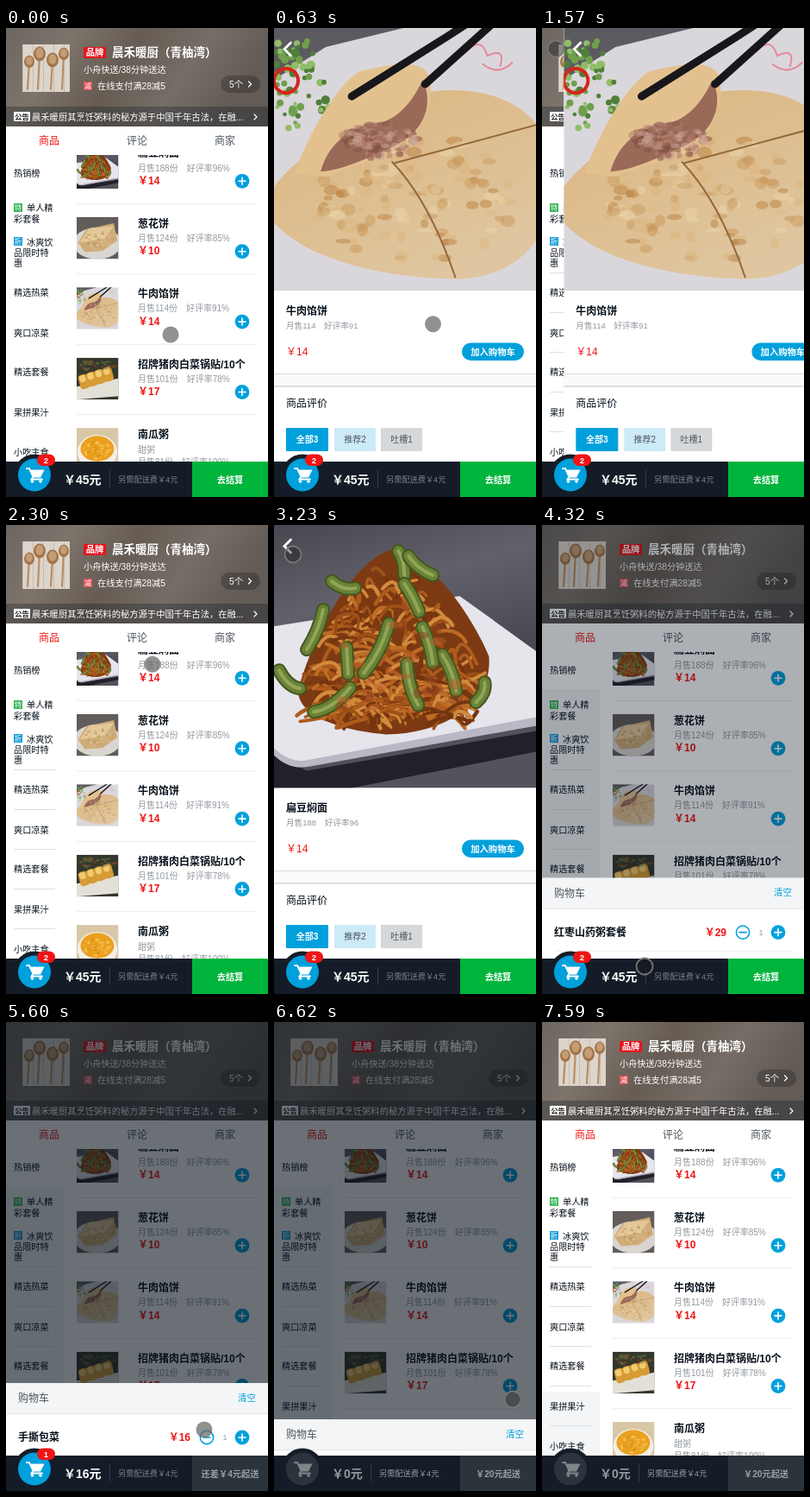
An HTML page for the animation above (7.71 s loop, 304x543 px).

```html
<!DOCTYPE html>
<html lang="zh-CN">
<head>
<meta charset="utf-8">
<style>
html,body{margin:0;width:100%;height:100%;overflow:hidden;background:#fff}
svg{display:block}
#stage{width:100vw;height:100vh}
text{font-family:"Liberation Sans","Noto Sans CJK SC","Noto Sans CJK",sans-serif;white-space:pre}
</style>
</head>
<body>
<svg id="stage" viewBox="0 0 304 543"></svg>
<script>
const LOOP = 7710;
const BLUE = '#00a0dc', RED = '#f01414', INK = '#07111b', GRAY = '#93999f';
const stage = document.getElementById('stage');

let seed = 7;
const rnd = () => (seed = seed * 16807 % 2147483647) / 2147483647;
const between = (a, b) => a + (b - a) * rnd();
const pick = list => list[Math.floor(rnd() * list.length)];
const times = (n, draw) => Array.from({length: n}, (_, i) => draw(i)).join('');

// Shape helpers; text is placed by its vertical centre.
const text = (x, y, size, str, fill = INK, extra = '') =>
  `<text x="${x}" y="${y + size * .36}" font-size="${size}" fill="${fill}" ${extra}>${str}</text>`;
const bold = 'font-weight="700"', mid = 'text-anchor="middle"';
const rect = (x, y, w, h, fill, extra = '') =>
  `<rect x="${x}" y="${y}" width="${w}" height="${h}" fill="${fill}" ${extra}/>`;
const circle = (x, y, r, fill, extra = '') =>
  `<circle cx="${x}" cy="${y}" r="${r}" fill="${fill}" ${extra}/>`;
const oval = (x, y, rx, ry, fill, extra = '') =>
  `<ellipse cx="${x}" cy="${y}" rx="${rx}" ry="${ry}" fill="${fill}" ${extra}/>`;
const path = (d, fill, extra = '') => `<path d="${d}" fill="${fill}" ${extra}/>`;
const line = (d, color, width = 1, extra = '') =>
  path(d, 'none', `stroke="${color}" stroke-width="${width}" stroke-linecap="round" ${extra}`);
const rule = (x, y, w, color = '#e4e6e8') => rect(x, y, w, 1, color);
const plus = (x, y) => circle(x, y, 8.4, BLUE) + line(`M${x - 4} ${y}h8M${x} ${y - 4}v8`, '#fff', 1.6);
const minus = (x, y) => circle(x, y, 7.6, '#fff', `stroke="${BLUE}" stroke-width="1.6"`) +
  line(`M${x - 4} ${y}h8`, BLUE, 1.6);
const tag = (x, y, str, fill) => rect(x, y - 5, 10, 10, fill) + text(x + 5, y, 8, str, '#fff', mid);

// Dishes, each on a 304 x 304 square.
const grains = (n, cx, cy, rx, ry, size, colors) => times(n, () => {
  const a = between(0, 6.283), r = Math.sqrt(rnd());
  return oval(cx + Math.cos(a) * r * rx, cy + Math.sin(a) * r * ry,
    between(.4, 1) * size, between(.25, .7) * size, pick(colors), 'opacity=".5"');
});

function noodles() {
  const strands = times(300, () => {
    const y = 40 + 190 * Math.sqrt(rnd()), half = Math.min(14 + (y - 30) * .72, 106);
    const x = 139 + between(-half, half) * .86, dx = between(-52, 52) * half / 106, dy = between(-16, 16);
    return line(`M${x - dx / 2} ${y - dy / 2}q${dx / 2 + between(-9, 9)} ${-between(2, 24)} ${dx} ${dy}`,
      pick(['#74350f', '#9c4f17', '#bd6c26', '#d28a3c', '#ae5b1d']), between(3, 4.5));
  });
  const beans = ['M57 98Q52 122 38 144', 'M133 114Q125 145 104 171', 'M84 142L86 172', 'M154 160Q156 190 167 208',
    'M46 216Q68 213 88 188', 'M6 168Q16 187 30 189', 'M195 150Q208 170 211 192', 'M144 30Q151 40 151 58',
    'M156 36Q165 50 184 58', 'M151 68Q162 84 168 100', 'M172 118Q182 140 184 160', 'M67 65Q80 76 94 73', 'M234 205Q246 194 244 182'];
  return rect(0, 0, 304, 304, 'url(#slate)') +
    path('M0 264L38 284 304 238V262L90 304H0Z', '#222028') +
    path('M0 117L70 106 215 82 304 146V229L42 278Q18 283 0 262Z', '#e6e5ec') +
    path('M0 258Q20 277 42 271L304 222V232L42 279Q18 284 0 266Z', '#b9b8c4') +
    path('M28 190C45 130 90 40 138 28 182 34 232 110 249 152 254 210 190 242 130 242 80 238 26 222 28 190Z', '#7d3a12') +
    strands + beans.map(d => line(d, '#43571f', 16) + line(d, '#6a8236', 12) + line(d, '#92a557', 4)).join('') +
    grains(30, 140, 165, 85, 65, 10, ['#8e3f1b', '#b95b2a']);
}

function beefPie() {
  const leaves = times(60, () => {
    const y = between(15, 118);
    return circle(between(2, y < 60 ? 45 : 66), y, between(2, 5.5), pick(['#6f9f4c', '#90bd68', '#4f7f38']));
  });
  return rect(0, 0, 304, 304, '#dad7dc') + path('M0 0H150L60 22 0 60Z', '#5b5a60') +
    line('M222 28q18-20 25 4q22-10 15 12M242 42q18 14 34-2', '#e58a98', 2) + leaves +
    circle(14, 61, 14, 'none', 'stroke="#d4261c" stroke-width="4"') +
    path('M0 184C15 160 90 100 150 80 230 58 285 84 304 112V245C285 275 245 292 205 290 130 288 40 270 0 225Z', 'url(#crust)') +
    grains(120, 165, 195, 120, 75, 10, ['#c99a5c', '#b98242', '#ecd5ac', '#dcb67d']) +
    line('M137 155Q180 200 210 288M140 156L304 112', '#94683a', 2) +
    path('M24 168C38 125 75 62 100 50 140 40 168 38 178 52 190 85 172 125 140 142L60 172Z', '#e3c18f') +
    path('M54 166C64 130 92 112 128 108 150 100 164 78 172 60 186 88 174 120 140 136 108 150 82 164 54 166Z', '#9a6a59') +
    grains(110, 122, 130, 46, 20, 7, ['#c09080', '#84503f', '#cfaa9c', '#ad7867']) +
    line('M90 79L202 9 222-4', '#17161a', 9) + line('M175 65L252-4', '#17161a', 9);
}

const onionPie = () => rect(0, 0, 304, 304, '#625d5b') + oval(150, 190, 175, 115, '#d9d5d0') +
  path('M10 185L70 90 270 45 295 170 190 245 60 255Z', '#cfac78') +
  path('M20 185L90 85 270 65 200 160Z', '#e4c798') + grains(50, 160, 165, 105, 65, 12, ['#b98845', '#efdcb4', '#a3985a']);

const dumplings = () => rect(0, 0, 304, 304, '#34382c') + path('M0 210L304 150V280L0 304Z', '#e3e0d8') +
  times(4, i => `<g transform="translate(${20 + i * 58} ${185 - i * 18}) rotate(-15)">` +
    rect(0, -55, 70, 105, '#d69b35', 'rx="24"') + rect(8, -50, 45, 50, '#f0cc73', 'rx="20"') + '</g>') +
  grains(30, 150, 55, 130, 40, 18, ['#6c7b3c', '#8c4a28']);

const porridge = () => rect(0, 0, 304, 304, '#d8c7a6') + oval(150, 175, 145, 125, '#f3efe6') +
  oval(150, 150, 122, 92, '#eaa01f') + grains(40, 150, 150, 100, 70, 16, ['#f7c34c', '#d98410', '#ffd978']);

const dishes = {noodles, onionPie, beefPie, dumplings, porridge};
const picture = (name, x, y, size) => `<use href="#${name}" x="${x}" y="${y}" width="${size}" height="${size}"/>`;

const spoons = () => rect(19, 19, 55, 55, '#dcd5cc') +
  times(5, i => rect(19 + i * 12, 19, 1, 55, '#c8bcb0')) +
  [[27, 39, 6], [39, 30, 7], [54, 37, 7], [67, 30, 6]].map(([x, y, r]) =>
    line(`M${x} ${y}L${x - 2} 71`, '#b98d64', 2.2) + oval(x, y, r, r * 1.2, '#a3744a') + oval(x, y - 1, r * .65, r * .85, '#c59d74')).join('');

const header = () => rect(0, 0, 304, 114, 'url(#wood)') + rect(0, 91, 304, 23, 'rgba(7,17,27,.28)') + spoons() +
  rect(90, 22, 26, 13, '#e8141c', 'rx="1"') + text(103, 28.5, 10.3, '品牌', '#fff', mid + ' ' + bold) +
  text(123, 28, 13.5, '晨禾暖厨（青柚湾）', '#fff', bold) +
  text(90, 48, 10.2, '小舟快送/38分钟送达', '#fff') +
  tag(90, 67, '减', '#e0555a') + text(106, 67, 10.3, '在线支付满28减5', '#fff') +
  rect(249, 55, 46, 20, 'rgba(0,0,0,.22)', 'rx="10"') + text(259, 65, 10.3, '5个', '#fff') +
  line('M281.5 62l3 3-3 3M288 100l3 3-3 3', '#fff', 1.2) +
  rect(9, 97, 19, 11, '#fff', 'rx="1"') + text(18.5, 102.5, 8.4, '公告', '#222', mid + ' ' + bold) +
  text(30, 103, 10.3, '晨禾暖厨其烹饪粥料的秘方源于中国千年古法，在融...', '#fff');

const tabs = () => rect(0, 114, 304, 33, '#fff') +
  text(50, 131, 12, '商品', RED, mid) + text(152, 131, 12, '评论', '#4d555d', mid) + text(254, 131, 12, '商家', '#4d555d', mid);

const sidebar = () => `<rect id="sideShade" width="67" fill="#f3f5f7"/>` +
  `<g id="sideRules">${times(5, i => rule(9, 283 + i * 46, 48, '#dcdfe2'))}</g>` +
  tag(9, 208, '特', '#35b558') + tag(9, 247, '折', '#1e9fd8') +
  [[168, '热销榜'], [208, '单人精', 24], [221, '彩套餐'], [248, '冰爽饮', 24], [260, '品限时特'], [272, '惠'], [306, '精选热菜'],
    [353, '爽口凉菜'], [398, '精选套餐'], [445, '果拼果汁'], [491, '小吃主食']]
    .map(([y, str, x = 9]) => text(x, y, 10.2, str)).join('');

const menu = [['noodles', '扁豆焖面', 188, 96, 14], ['onionPie', '葱花饼', 124, 85, 10], ['beefPie', '牛肉馅饼', 114, 91, 14],
  ['dumplings', '招牌猪肉白菜锅贴/10个', 101, 78, 17], ['porridge', '南瓜粥', 81, 100, 10]];
const menuRow = ([art, name, sold, rate, price], i) => {
  const y = 137.5 + i * 81.4, sub = art == 'porridge' ? 15 : 0;
  return picture(art, 82, y, 48.5) + text(153, y + 7.5, 12, name, INK, bold) +
    (sub ? text(153, y + 25.5, 10, '甜粥', GRAY) : '') +
    text(153, y + 24.5 + sub, 10, `月售${sold}份　好评率${rate}%`, GRAY) +
    (sub ? '' : text(153, y + 39, 12, '￥' + price, RED, bold) + plus(274, y + 39.8)) +
    rule(82, y + 65.5, 208, '#ebecee');
};

const chip = (x, w, label, fill, color, weight = '') =>
  rect(x, 463, w, 27, fill, 'rx="1"') + text(x + w / 2, 476.5, 10, label, color, mid + ' ' + weight);
const detail = ([art, name, sold, rate, price], id) => `<g id="${id}">` + rect(0, 0, 304, 502, '#fff') +
  picture(art, 0, 0, 304.5) + line('M19.5 17l-7.5 7.5 7.5 7.5', '#fff', 2.8) +
  text(14, 328, 12, name, INK, bold) + text(14, 344.5, 9.6, `月售${sold}　好评率${rate}`, GRAY) +
  text(14, 375, 12, '￥' + price, RED) + rect(218, 364.5, 72, 20.5, BLUE, 'rx="10.2"') +
  text(254, 375, 10.3, '加入购物车', '#fff', mid + ' ' + bold) +
  rect(0, 400, 304, 15, '#f9fafb') + rule(0, 400, 304, '#dadcde') + rect(0, 414, 304, 1.6, '#d6d8da') +
  text(14, 434.5, 12, '商品评价') +
  chip(14, 49, '全部3', BLUE, '#fff', bold) + chip(70, 48, '推荐2', '#cceaf7', '#4d555d') +
  chip(124, 48, '吐槽1', '#d6d7d9', '#4d555d') + '</g>';

const goods = [['红枣山药粥套餐', 29], ['手撕包菜', 16]];
const cartRow = ([name, price], i) => {
  const y = 63 + i * 42;
  return text(14, y, 12, name, INK, bold) +
    text(214, y, 12, '￥' + price, RED, 'text-anchor="end" ' + bold) +
    minus(233, y) + text(254, y, 9, '1', GRAY, mid) + plus(274, y) + rule(14, y + 21, 276, '#eceef0');
};
const sheet = rows => rect(0, 0, 304, 134, '#fff') + rect(0, 0, 304, 35, '#f3f5f7') + rule(0, 35, 304) +
  text(14, 18, 12, '购物车', '#4d555d') + text(290, 17, 10.5, '清空', BLUE, 'text-anchor="end"') + rows.map(cartRow).join('');

const footer = total => {
  const full = total >= 20, right = total ? 120 : 112, pay = full ? '去结算' : total ? `还差￥${20 - total}元起送` : '￥20元起送';
  const count = total == 45 ? 2 : 1, icon = total ? '#fff' : '#80858a';
  return rect(0, 502, 304, 41, '#141d27') + circle(33, 517.5, 24, '#141d27') + circle(33, 517.5, 19, total ? BLUE : '#2b343c') +
    line('M24 510h3l4.5 9.5h8l3.5-7H29M31.5 519.5l-2 3H42', icon, 1.9) + path('M29 512h14l-3.5 7.5h-8Z', icon) +
    circle(30.5, 525, 1.8, icon) + circle(40, 525, 1.8, icon) +
    (total ? rect(36, 493.5, 21, 13.5, RED, 'rx="6.75"') + text(46.5, 500.3, 9.5, count, '#fff', mid + ' ' + bold) : '') +
    text(67, 522.5, 14, `￥${total}元`, total ? '#fff' : '#969a9e', bold) + rect(right, 512, 1, 20, '#353d46') +
    text(right + 10, 523, 9.2, `另需配送费￥4元`, total ? '#7a8087' : '#969a9e') +
    rect(216, 502, 88, 41, full ? '#00b43c' : '#2b333b') + text(260, 523, 10.2, pay, full ? '#fff' : '#9a9fa3', mid + ' ' + bold);
};

const gradient = (id, dir, ...colors) => `<linearGradient id="${id}" ${dir}>` +
  colors.map((c, i) => `<stop offset="${i / (colors.length - 1)}" stop-color="${c}"/>`).join('') + '</linearGradient>';

stage.innerHTML = '<defs>' +
  gradient('slate', 'x2=".3" y2="1"', '#48474f', '#62616b', '#4a4852', '#55525c') +
  gradient('crust', 'x2=".6" y2="1"', '#dcb67f', '#ddbd8e', '#dfc6a0') +
  gradient('wood', 'x2="1" y2=".25"', '#6c6661', '#7d746b', '#665c53', '#756d66', '#625b56') +
  Object.entries(dishes).map(([id, draw]) => `<symbol id="${id}" viewBox="0 0 304 304">${draw()}</symbol>`).join('') +
  '<clipPath id="listClip"><rect y="146" width="304" height="356"/></clipPath></defs>' +
  rect(0, 0, 304, 543, '#fff') + `<g clip-path="url(#listClip)">${menu.map(menuRow).join('')}</g>` +
  sidebar() + tabs() + header() + detail(menu[2], 'pieView') + detail(menu[0], 'noodleView') +
  rect(0, 0, 304, 502, INK, 'id="mask"') + '<g id="sheet"></g><g id="footer"></g>' + circle(0, 0, 9.5, '#666', 'id="touch"');

const el = Object.fromEntries([...stage.querySelectorAll('g[id],rect[id],circle[id]')].map(n => [n.id, n]));
const ramp = (t, a, b) => Math.min(1, Math.max(0, (t - a) / (b - a)));
const within = (t, a, b) => t >= a && t < b;

// Moves of the pointer: start, end, x, y.
const moves = [[0, 0, 191, 355], [550, 1250, 16, 24], [1800, 2400, 182, 172], [2800, 3200, 22, 34],
  [3600, 4130, 119, 511], [4500, 4950, 232, 439], [5200, 5550, 230, 472], [5950, 6500, 277, 437]];
const presses = [[180, 320], [1400, 1760], [2450, 2600], [3200, 3500], [4150, 4460], [5000, 5120], [6560, 6900]];
const rests = [[0, 150], [1570, 150], [3230, 120], [4320, 120], [5600, 150], [6620, 120], [7590, 120]];

let shownTotal = -1;
function render(now) {
  let t = now % LOOP;
  const rest = rests.find(([at, length]) => within(t, at, at + length));
  if (rest) t = rest[0];

  const slide = (view, inAt, outAt) => {
    const x = 304 * (1 - ramp(t, inAt, inAt + 220) + ramp(t, outAt, outAt + 300));
    view.setAttribute('transform', `translate(${x} 0)`);
    view.style.display = x < 304 ? '' : 'none';
  };
  slide(el.pieView, 260, 1545);
  slide(el.noodleView, 2540, 3360);

  const total = t < 5080 ? 45 : t < 5820 ? 16 : 0;
  const rows = total == 45 ? goods : total ? goods.slice(1) : [];
  if (total != shownTotal) {
    el.sheet.innerHTML = sheet(rows);
    el.footer.innerHTML = footer(total);
    shownTotal = total;
  }
  const closing = ramp(t, 6780, 7060), open = ramp(t, 4200, 4362) - closing;
  el.sheet.setAttribute('transform', `translate(0 ${502 - open * (42 + 42 * rows.length)})`);
  el.sheet.style.display = open > 0 ? '' : 'none';
  el.mask.setAttribute('opacity', .6 * (ramp(t, 4200, 4415) - closing));

  const top = t > 7060 ? 428 : 190;
  el.sideShade.setAttribute('y', top);
  el.sideShade.setAttribute('height', 502 - top);
  el.sideShade.style.display = t > 4200 ? '' : 'none';
  el.sideRules.style.display = t > 150 ? '' : 'none';

  let [, , x, y] = moves[0];
  for (const [a, b, toX, toY] of moves.slice(1)) {
    const p = ramp(t, a, b), k = p * p * (3 - 2 * p);
    x += (toX - x) * k;
    y += (toY - y) * k;
  }
  const pressed = presses.some(([a, b]) => within(t, a, b));
  el.touch.setAttribute('transform', `translate(${x} ${y})`);
  el.touch.setAttribute('fill-opacity', pressed ? .4 : .72);
  el.touch.setAttribute('fill', pressed ? '#181818' : '#666');
  el.touch.setAttribute('stroke', pressed ? '#777' : 'none');
  el.touch.setAttribute('stroke-width', 1.8);
  el.touch.setAttribute('opacity', 1 - ramp(t, 7050, 7250));
}

const start = performance.now();
function tick() {
  render(performance.now() - start);
  requestAnimationFrame(tick);
}
tick();
</script>
</body>
</html>
```
